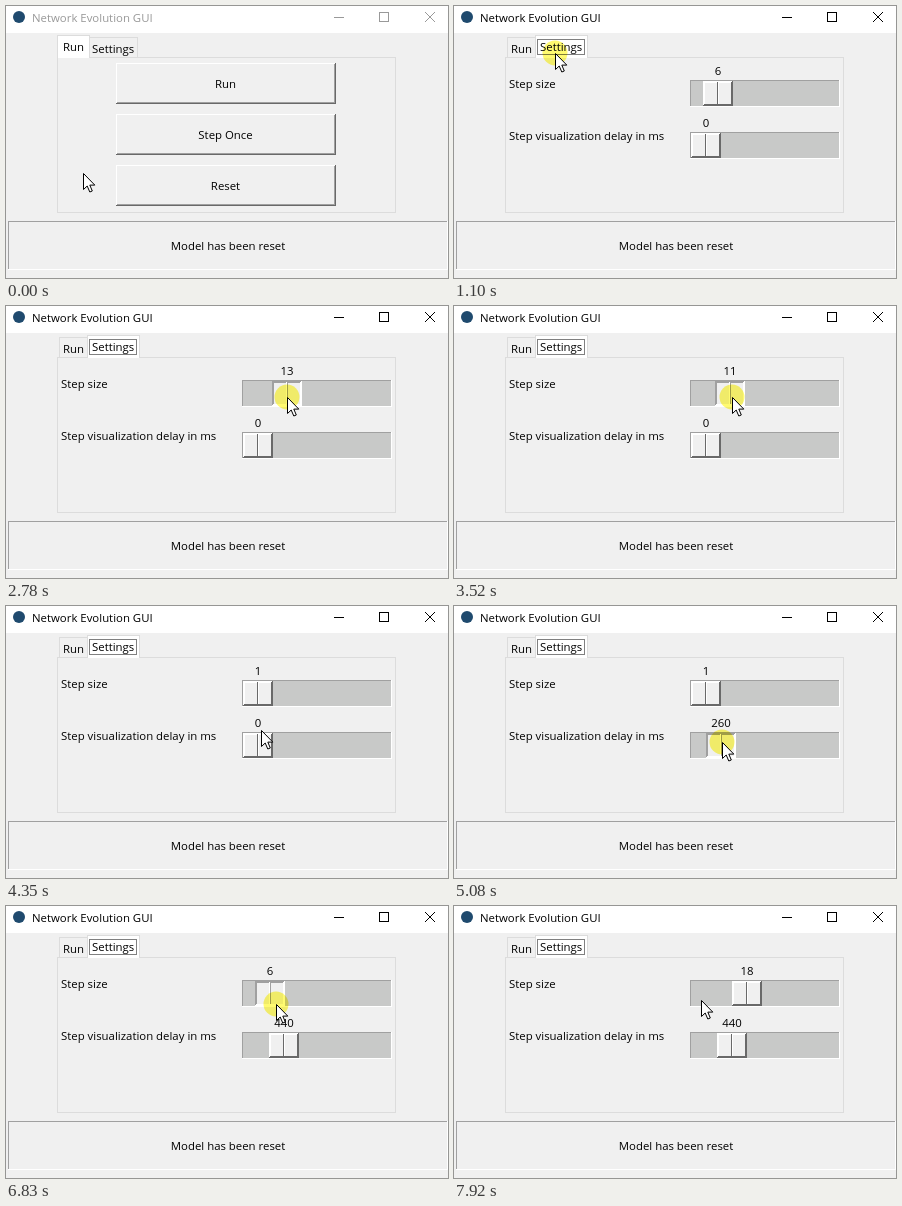
Animation, 442 px wide and 272 px high, one loop 7.99 s. Source, as an HTML page with a canvas:

```html
<!DOCTYPE html>
<html lang="en">
<head>
<meta charset="utf-8">
<title>Network Evolution GUI</title>
<style>
  html, body { margin: 0; width: 100%; height: 100%; overflow: hidden; background: #f0f0f0; }
  canvas { display: block; }
</style>
</head>
<body>
<canvas id="stage" width="442" height="272"></canvas>
<script>
const ctx = document.getElementById('stage').getContext('2d');
const LOOP = 7990, ACTIVATED = 960;
const FACE = '#f0f0f0', LIGHT = '#ffffff', SHADOW = '#a0a0a0', DARK = '#696969', RULE = '#dcdcdc';
const TRAVEL = 117;   // pixels a slider thumb can move

// Pointer path: time, x, y
const path = [
  [0, 77, 167], [70, 77, 167], [830, 101, 47], [1570, 101, 47], [2190, 265, 88],
  [2610, 265, 88], [2780, 281, 91], [3050, 294, 91], [3320, 294, 91], [3800, 252, 91],
  [3900, 252, 91], [4130, 246, 102], [4350, 255, 124], [4490, 253, 135], [4690, 253, 135],
  [5380, 278, 137], [5580, 278, 137], [5640, 279, 137], [5920, 279, 137], [6500, 258, 98],
  [6620, 258, 98], [6830, 270, 98], [7440, 301, 98], [7510, 301, 98], [7920, 247, 94], [LOOP, 247, 94]
];

// Mouse presses; those with a slider drag its thumb, held at the grab offset
const presses = [
  { from: ACTIVATED, to: 1230 },
  { from: 2520, to: 3940, slider: 'size', grab: 16 },
  { from: 4550, to: 5740, slider: 'delay', grab: 16 },
  { from: 6560, to: 7570, slider: 'size', grab: 21 }
];

const sliders = {
  size:  { y: 74,  min: 1, max: 50,   step: 1,  start: 6, label: 'Step size' },
  delay: { y: 126, min: 0, max: 2000, step: 10, start: 0, label: 'Step visualization delay in ms' }
};

function tangent(i, axis) {
  if (i === 0 || i === path.length - 1) return 0;
  const [a, b, c] = [path[i - 1], path[i], path[i + 1]];
  if (a[axis] === b[axis] || b[axis] === c[axis]) return 0;
  return (c[axis] - a[axis]) / (c[0] - a[0]);
}

function pointerAt(t) {
  const i = Math.max(0, path.findIndex(p => p[0] > t) - 1);
  const span = path[i + 1][0] - path[i][0], u = (t - path[i][0]) / span;
  return [1, 2].map(axis => Math.round(
    path[i][axis] * (1 + 2 * u) * (1 - u) ** 2 + path[i + 1][axis] * u * u * (3 - 2 * u) +
    span * (tangent(i, axis) * u * (1 - u) ** 2 + tangent(i + 1, axis) * u * u * (u - 1))));
}

function valueAt(name, t) {
  const { min, max, step, start } = sliders[name];
  const drag = presses.filter(p => p.slider === name && t >= p.from).pop();
  if (!drag) return start;
  const offset = pointerAt(Math.min(t, drag.to))[0] - drag.grab - 237;
  const share = Math.min(1, Math.max(0, offset / TRAVEL));
  return min + Math.round(share * (max - min) / step) * step;
}

function fill(x, y, w, h, color) {
  ctx.fillStyle = color;
  ctx.fillRect(x, y, w, h);
}

function bevel(x, y, w, h, topLeft, bottomRight) {
  fill(x, y, w, 1, topLeft);
  fill(x, y, 1, h, topLeft);
  fill(x, y + h - 1, w, 1, bottomRight);
  fill(x + w - 1, y, 1, h, bottomRight);
}

function text(str, x, y, align = 'left', color = '#000') {
  ctx.font = '11.4px "Open Sans", sans-serif';
  ctx.textAlign = align;
  ctx.fillStyle = color;
  ctx.fillText(str, x, y);
}

function polyline(points, color) {
  ctx.beginPath();
  points.forEach(([x, y]) => ctx.lineTo(x, y));
  ctx.strokeStyle = color;
  ctx.lineWidth = 1;
  ctx.stroke();
}

function drawTitleBar(active) {
  const ink = active ? '#000' : '#999';
  fill(0, 0, 442, 27, LIGHT);
  ctx.beginPath();
  ctx.arc(13, 11, 6, 0, 7);
  ctx.fillStyle = '#1f4a6e';
  ctx.fill();
  text('Network Evolution GUI', 26, 16, 'left', ink);
  fill(328, 11, 10, 1, ink);
  bevel(373, 6, 10, 10, ink, ink);
  polyline([[419, 6], [429, 16]], ink);
  polyline([[429, 6], [419, 16]], ink);
}

function drawTab(label, x, w, textX, selected, color) {
  const y = selected ? 29 : 31;
  fill(x, y, w, 52 - y, color);
  bevel(x, y, w, 52 - y, RULE, RULE);
  if (selected) fill(x + 1, 51, w - 2, 1, color);
  text(label, textX, selected ? 45 : 47);
}

function drawTabs(settingsOpen, hover) {
  bevel(51, 51, 339, 156, RULE, RULE);
  if (!settingsOpen) {
    drawTab('Settings', 83, 49, 86, false, hover ? '#d8eaf9' : FACE);
    drawTab('Run', 51, 33, 57, true, LIGHT);
    return;
  }
  drawTab('Run', 53, 29, 57, false, FACE);
  drawTab('Settings', 81, 53, 86, true, LIGHT);
  ctx.setLineDash([1, 1]);
  ctx.strokeStyle = '#000';
  ctx.lineWidth = 1;
  ctx.strokeRect(83.5, 33.5, 47, 15);
  ctx.setLineDash([]);
}

function drawButton(label, y) {
  bevel(110, y, 220, 41, LIGHT, DARK);
  bevel(111, y + 1, 218, 39, FACE, SHADOW);
  text(label, 219.5, y + 25, 'center');
}

function drawSlider(name, t, held) {
  const { y, min, max, label } = sliders[name];
  const value = valueAt(name, t);
  const x = 237 + Math.round((value - min) / (max - min) * TRAVEL);
  const edges = held ? [SHADOW, LIGHT] : [LIGHT, DARK];
  text(label, 55, y + 8);
  text(value, x + 15, y - 5, 'center');
  fill(236, y, 150, 27, '#c8c9c8');
  bevel(236, y, 150, 27, SHADOW, LIGHT);
  fill(x, y + 1, 30, 25, FACE);
  bevel(x, y + 1, 30, 25, ...edges);
  bevel(x + 1, y + 2, 14, 23, ...edges);
  bevel(x + 15, y + 2, 14, 23, ...edges);
}

function drawPointer(x, y, pressed) {
  if (pressed) {
    ctx.globalCompositeOperation = 'multiply';
    ctx.beginPath();
    ctx.arc(x, y, 12.5, 0, 7);
    ctx.fillStyle = '#fffa70';
    ctx.fill();
    ctx.globalCompositeOperation = 'source-over';
  }
  ctx.save();
  ctx.translate(x + 0.5, y + 0.5);
  const arrow = new Path2D('M0 0V16L3.7 12.5L6.3 18.5L8.8 17.5L6.3 11.6H11.3Z');
  ctx.fillStyle = '#fff';
  ctx.strokeStyle = '#000';
  ctx.lineWidth = 1;
  ctx.fill(arrow);
  ctx.stroke(arrow);
  ctx.restore();
}

function draw(t) {
  const [x, y] = pointerAt(t);
  const press = presses.find(p => t >= p.from && t < p.to);
  const active = t >= ACTIVATED;
  fill(0, 0, 442, 272, FACE);
  drawTitleBar(active);
  drawTabs(active, x >= 83 && x < 132 && y >= 31 && y < 51);
  if (active) {
    for (const name in sliders) drawSlider(name, t, press?.slider === name);
  } else {
    ['Run', 'Step Once', 'Reset'].forEach((label, i) => drawButton(label, 57 + 51 * i));
  }
  bevel(2, 215, 440, 49, SHADOW, LIGHT);
  text('Model has been reset', 222, 244, 'center');
  drawPointer(x, y, press);
}

function tick() {
  draw(performance.now() % LOOP);
  requestAnimationFrame(tick);
}
tick();
</script>
</body>
</html>
```
